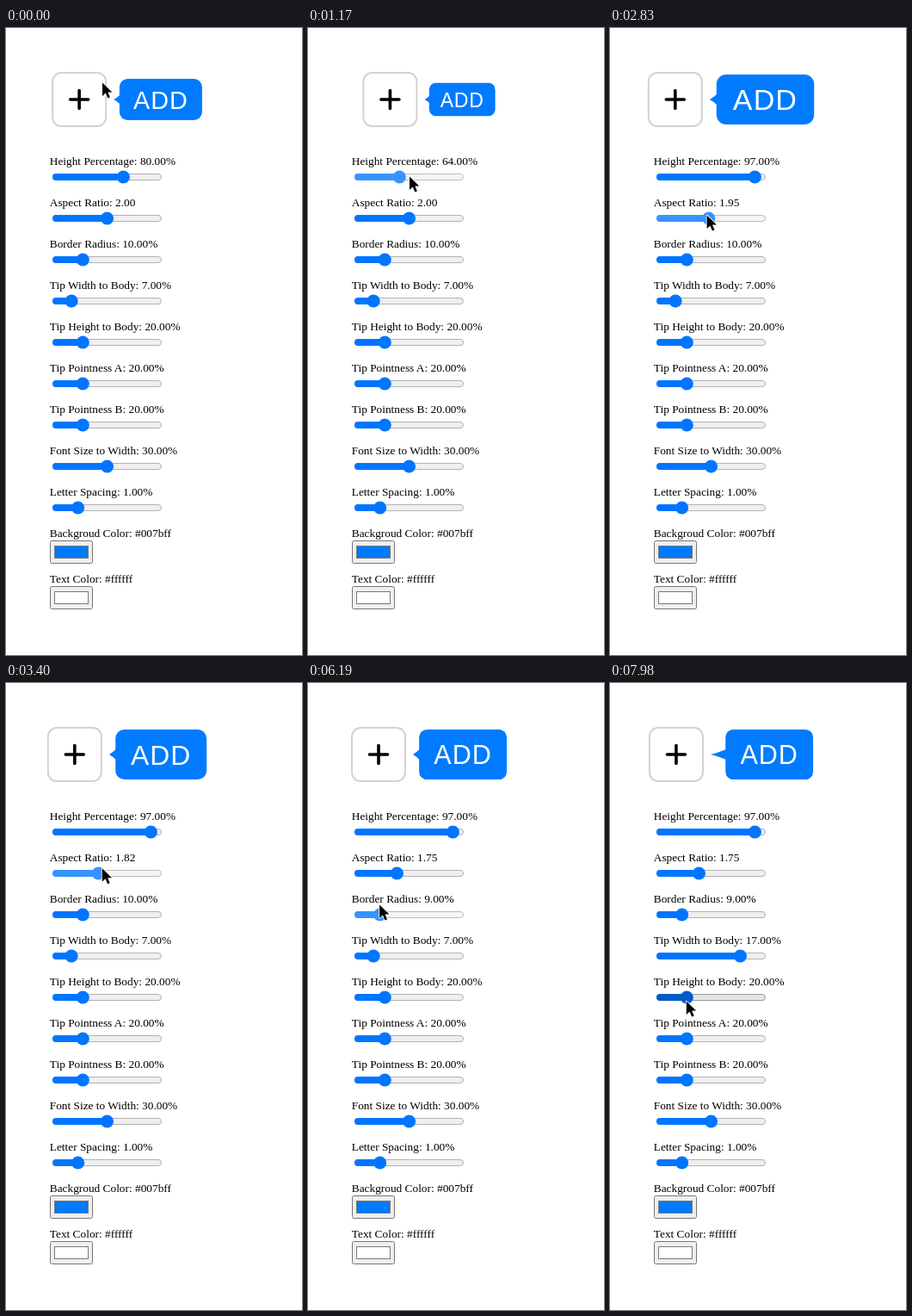
Animation, 344 px wide and 728 px high, one loop 8 s. Source, as an HTML page:

```html
<!DOCTYPE html>
<html lang="en">
<head>
<meta charset="utf-8">
<title>Tooltip settings</title>
<style>
html, body { margin: 0; width: 100%; height: 100%; overflow: hidden; background: #fff; }
svg { display: block; width: 344px; height: 728px; }
.label { font: 13.333px "Liberation Serif", serif; }
#word { font-family: "Liberation Sans", sans-serif; fill: #fff; }
</style>
</head>
<body>
<svg viewBox="0 0 344 728">
  <g id="button">
    <rect x="1" y="52" width="62" height="62" rx="10" fill="#fff" stroke="#d3d3d3" stroke-width="2"/>
    <path d="M21.5 83H42.5M32 72.5V93.5" stroke="#000" stroke-width="3.6" stroke-linecap="round"/>
  </g>
  <rect id="bubble" fill="#007bff"/>
  <path id="tip" fill="#007bff"/>
  <text id="word">ADD</text>
  <g id="panel"></g>
  <path id="cursor" d="M.5 1.5V17L4.3 13.6L6.8 19.6L9.4 18.5L6.9 12.6H11.8Z" stroke="#fff" stroke-width="1.6" paint-order="stroke" stroke-linejoin="round"/>
</svg>
<script>
const LOOP = 8000;
const LEAD = 25; // ms the pointer runs ahead of the dragged thumb
const START = { x: 111.5, y: 62 };
const $ = id => document.getElementById(id);

function set(el, attrs) {
  for (const k in attrs) el.setAttribute(k, attrs[k]);
  return el;
}
function add(tag, attrs) {
  return $("panel").appendChild(set(document.createElementNS("http://www.w3.org/2000/svg", tag), attrs));
}
function label(y, text) {
  const el = add("text", { x: 50.8, y, class: "label" });
  el.textContent = text;
  return el;
}
const mix = (a, b, k) => a + (b - a) * k;
function ease(t, from, to) {
  const u = Math.min(1, Math.max(0, (t - from) / (to - from)));
  return u * u * (3 - 2 * u);
}

// travel: pointer comes to the slider; drags: [start, end, new value]; dy: pointer height at grab and release
const rows = [
  { name: "Height Percentage", min: 40, max: 100, first: 80, travel: [0, 810], dy: [-2, -2],
    drags: [[840, 1079, 51], [1079, 1350, 100], [1650, 1860, 97]] },
  { name: "Aspect Ratio", min: 1, max: 3, first: 2, unit: "", travel: [2020, 2590], dy: [-5, -11],
    drags: [[2740, 3100, 1.68], [3328, 3520, 2.12], [3950, 4310, 1.75]] },
  { name: "Border Radius", min: 5, max: 25, first: 10, travel: [4530, 4800], dy: [0, -13],
    drags: [[5110, 5530, 20], [5740, 6190, 9]] },
  { name: "Tip Width to Body", min: 5, max: 20, first: 7, travel: [6440, 6680], dy: [4, 23],
    drags: [[6830, 7310, 17]] },
  { name: "Tip Height to Body", min: 15, max: 35, first: 20, travel: [7560, 7980], dy: [3, 3] },
  { name: "Tip Pointness A", min: 15, max: 35, first: 20 },
  { name: "Tip Pointness B", min: 15, max: 35, first: 20 },
  { name: "Font Size to Width", min: 20, max: 40, first: 30 },
  { name: "Letter Spacing", min: 0, max: 5, first: 1 }
];
const stops = rows.filter(r => r.travel);
const looks = {
  idle: ["#0075ff", "#efefef", "#b2b2b2"],
  hover: ["#005cc8", "#e5e5e5", "#999"],
  press: ["#3793ff", "#f5f5f5", "#bdbdbd"]
};

rows.forEach((r, i) => {
  r.drags = r.drags || [];
  r.y = 173 + i * 48;
  r.label = label(r.y - 14, "");
  r.rail = add("rect", { x: 54.5, y: r.y - 3.5, width: 126, height: 7, rx: 3.5 });
  r.fill = add("rect", { x: 54, y: r.y - 4, height: 8, rx: 4 });
  r.thumb = add("circle", { cy: r.y, r: 7.6 });
});
[["Backgroud Color", "#007bff", 595], ["Text Color", "#ffffff", 648]].forEach(([name, color, y]) => {
  label(y - 4, name + ": " + color);
  add("rect", { x: 51.5, y: y + .5, width: 49, height: 26, rx: 2, fill: "#efefef", stroke: "#767676" });
  add("rect", { x: 56.5, y: y + 6.5, width: 39, height: 14, fill: color, stroke: "#777" });
});

const valueAt = (r, t) => r.drags.reduce((v, [from, to, goal]) => mix(v, goal, ease(t, from, to)), r.first);
const thumbX = (r, v) => 61 + 113 * (v - r.min) / (r.max - r.min);

// Pointer place while it rests on or drags slider r
function grip(r, t) {
  const d = r.drags;
  const k = d.length ? ease(t, d[0][0], d[d.length - 1][1]) : 0;
  return { x: thumbX(r, valueAt(r, t + LEAD)) - 1, y: r.y + mix(r.dy[0], r.dy[1], k) };
}

function pointerAt(t) {
  const i = stops.filter(r => r.travel[0] <= t).length - 1;
  const a = i ? grip(stops[i - 1], t) : START, b = grip(stops[i], t);
  const k = ease(t, ...stops[i].travel);
  return { x: mix(a.x, b.x, k), y: mix(a.y, b.y, k) };
}

function isPressed(r, t) {
  const next = stops[stops.indexOf(r) + 1];
  return r.drags.length > 0 && t >= r.drags[0][0] && t < next.travel[0];
}

function drawRow(r, t, p) {
  const step = r.unit === "" ? 100 : 1;
  r.value = Math.round(valueAt(r, t) * step) / step;
  const over = p.x >= 53 && p.x <= 182 && Math.abs(p.y - r.y) <= 8;
  const [blue, grey, edge] = looks[isPressed(r, t) ? "press" : over ? "hover" : "idle"];
  const cx = thumbX(r, r.value);
  r.label.textContent = r.name + ": " + r.value.toFixed(2) + (r.unit ?? "%");
  set(r.rail, { fill: grey, stroke: edge });
  set(r.fill, { width: cx - 54, fill: blue });
  set(r.thumb, { cx, fill: blue });
}

function drawTooltip() {
  const [height, aspect, radius, tipW, tipH, , , font, spacing] = rows.map(r => r.value);
  const mid = 83;
  const h = 60 * height / 100, w = h * aspect;
  const tw = w * tipW / 100, th = h * tipH / 100;
  const left = 140.5 - (72 + tw + w) / 2;
  const tipX = left + 72, x = tipX + tw;
  const size = w * font / 100, gap = w * spacing / 100;
  const bend = tipX + tw * .6;
  set($("button"), { transform: `translate(${left} 0)` });
  set($("bubble"), { x, y: mid - h / 2, width: w, height: h, rx: w * radius / 100 });
  set($("tip"), {
    d: `M${tipX} ${mid}Q${bend} ${mid - th * .22} ${x} ${mid - th / 2}h.6v${th}h-.6Q${bend} ${mid + th * .22} ${tipX} ${mid}Z`
  });
  // Advance of "ADD" is 2.111em, with spacing after every letter
  set($("word"), {
    x: x + (w - 2.111 * size - 3 * gap) / 2,
    y: mid + .6 + .3465 * size,
    "font-size": size,
    "letter-spacing": gap
  });
}

function draw(t) {
  const p = pointerAt(t);
  rows.forEach(r => drawRow(r, t, p));
  drawTooltip();
  set($("cursor"), { transform: `translate(${p.x} ${p.y})` });
}

function loop() {
  draw(performance.now() % LOOP);
  requestAnimationFrame(loop);
}
loop();
</script>
</body>
</html>
```
